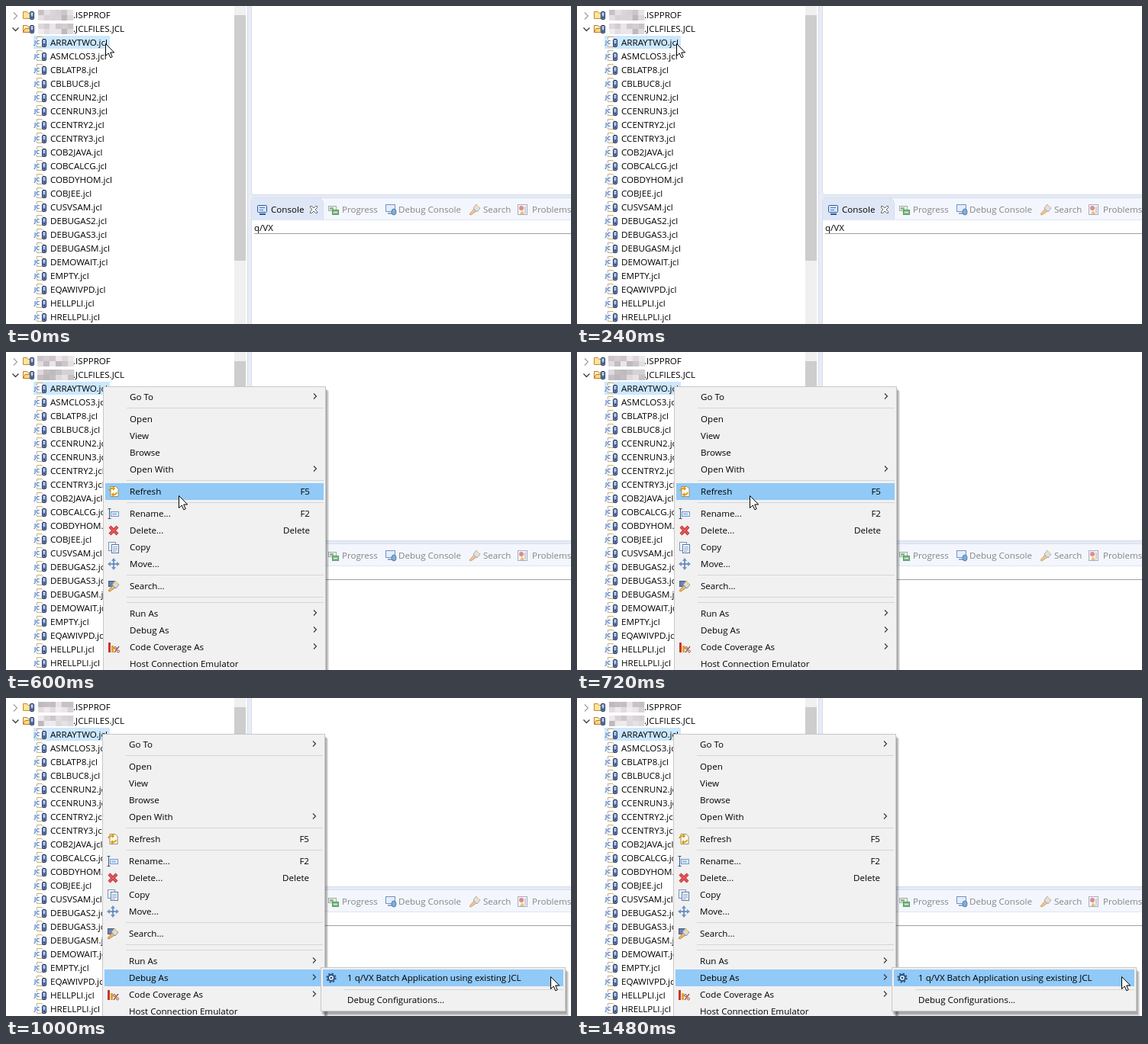
Animation of 740x417 px, one loop 1800 ms. Source, as an HTML page:

```html
<!DOCTYPE html>
<html lang="en">
<head>
<meta charset="utf-8">
<title>Context menu</title>
<style>
html, body { margin: 0; width: 100%; height: 100%; overflow: hidden; background: #fff; }
svg { display: block; width: 740px; height: 417px; }
text { font: 11.6px "Open Sans", "Noto Sans", sans-serif; white-space: pre; }
</style>
</head>
<body>
<svg viewBox="0 0 740 417"><g id="base"></g><g id="live"></g></svg>
<script>
const files = `ARRAYTWO ASMCLOS3 CBLATP8 CBLBUC8 CCENRUN2 CCENRUN3 CCENTRY2 CCENTRY3 COB2JAVA COBCALCG
  COBDYHOM COBJEE CUSVSAM DEBUGAS2 DEBUGAS3 DEBUGASM DEMOWAIT EMPTY EQAWIVPD HELLPLI HRELLPLI`.split(/\s+/);

// label, centre below the menu top, shortcut or '>', icon
const items = [
  ['Go To', 13, '>'], ['Open', 42], ['View', 64], ['Browse', 86], ['Open With', 108, '>'],
  ['Refresh', 137, 'F5', 'refresh'], ['Rename...', 166, 'F2', 'rename'],
  ['Delete...', 188, 'Delete', 'remove'], ['Copy', 210, '', 'copy'], ['Move...', 232, '', 'move'],
  ['Search...', 261, '', 'torch'], ['Run As', 297, '>'], ['Debug As', 319, '>'],
  ['Code Coverage As', 341, '>', 'bars'], ['Host Connection Emulator', 363]
];
const rules = [28, 123, 152, 247, 276, 283];

const poses = [
  { at: 0, tip: [130, 49], blur: [42, 46] },
  { at: 400, tip: [129, 49], blur: [42, 46], menu: [129, 50] },
  { at: 600, tip: [226, 188], blur: [41, 48], menu: [127, 45], hot: 'Refresh' },
  { at: 800, tip: [254, 302], blur: [42, 46], menu: [131, 45], hot: 'Search...' },
  { at: 1000, tip: [713, 365], blur: [42, 46], menu: [126, 47], hot: 'Debug As', sub: [412, 353] }
];

const rect = (x, y, w, h, fill, more = '') =>
  `<rect x="${x}" y="${y}" width="${w}" height="${h}" fill="${fill}" ${more}/>`;
const box = (x, y, w, h, fill, edge, more = '') =>
  rect(x + .5, y + .5, w - 1, h - 1, fill, `stroke="${edge}" ${more}`);
const path = (d, fill, stroke = 'none', width = 1) =>
  `<path d="${d}" fill="${fill}" stroke="${stroke}" stroke-width="${width}"/>`;
const text = (x, y, s, fill = '#000', more = '') =>
  `<text x="${x}" y="${y}" fill="${fill}" ${more}>${s}</text>`;
const put = (x, y, s) => `<g transform="translate(${x} ${y})">${s}</g>`;

const tower = box(0, 0, 6, 11, '#7d94c0', '#1d3361', 'rx="1.5"') +
  path('M1.5 2.5H4.5M1.5 4.5H4.5', 'none', '#e4ecfa') + rect(2, 7, 2, 2, '#24407a');

// Icons are centred on the origin.
const torch = path('M-7 6L-1-1 2 2-5 7Z', '#efb769', '#bd8440') +
  path('M-2-2L2-7 7-2 3 3Z', '#d7dbe5', '#8c93a6') + path('M2-6L6-2', 'none', '#f6cf70', 2);
const icons = {
  refresh: path('M-4-6.5H3L6-3.5V6.5H-4Z', '#fffdf2', '#a58b54') +
    path('M-6-1Q-5-5 0-4M-1-6L1-4-1-2M4 1Q3 5-2 4M0 2L-2 4 0 6', 'none', '#d99a16', 1.7),
  rename: box(-4, -3, 11, 7, '#eaf3fd', '#6d98c7') + rect(-2, -1, 6, 3, '#a9c9ea') +
    path('M-7.5-6.5H-3.5M-5.5-6V6M-7.5 6.5H-3.5', 'none', '#37577d'),
  remove: path('M-5-5L5 5M5-5L-5 5', 'none', '#b92d32', 4) + path('M-5-5L5 5M5-5L-5 5', 'none', '#e7595b', 2.3),
  copy: box(-7, -7, 10, 12, '#f3f7fd', '#7f95b4') + box(-3, -4, 10, 12, '#fff', '#587aa6') +
    path('M-1-.5H5M-1 1.5H5M-1 3.5H5M-1 5.5H3', 'none', '#85a6d0'),
  move: path('M0-6V6M-6 0H6', 'none', '#537cb5', 1.5) +
    path('M-3-4L0-8 3-4ZM-3 4L0 8 3 4ZM-4-3L-8 0-4 3ZM4-3L8 0 4 3Z', '#6d94c8'),
  torch: box(-7, -7, 9, 8, '#6c83ad', '#485c83') + torch,
  bars: rect(-7, -6, 3, 13, '#c9352f') + rect(-3, -2, 3, 9, '#e2a52d') +
    path('M1 7L7-1', 'none', '#703026', 1.2) +
    '<circle cx="2" cy="1" r="1.5" fill="none" stroke="#b04a36"/><circle cx="6" cy="5.5" r="1.5" fill="none" stroke="#b04a36"/>',
  gear: '<circle r="4" fill="#dcebfa" stroke="#294f7d" stroke-width="2"/>' +
    '<circle r="5.8" fill="none" stroke="#294f7d" stroke-width="1.6" stroke-dasharray="2.3 2.25"/>' +
    '<circle r="1.3" fill="#294f7d"/>'
};

function tree() {
  const folder = path('M.5 10.5V1.5H5.5L7 3.5H13.5V10.5Z', '#ffe49a', '#c28b2e');
  const openFolder = path('M.5 10.5V1.5H5.5L7 3.5H12.5V10.5Z', '#fff1c4', '#b97c28') +
    path('M.5 10.5L3 5.5H14L12 10.5Z', '#ffd982', '#b97c28');
  const fileIcon = path('M3.5.5H10L13.5 4V13.5H3.5Z', '#fffef7', '#c6b17c') +
    rect(0, 4, 10, 7, '#f4f8ff') +
    text(0, 10.2, 'JC', '#2458ad', 'style="font-size:7.6px;font-weight:600"') + put(10, 3, tower);
  return path('M10 8.5L14.5 13 10 17.5', 'none', '#a0a0a0', 1.2) +
    path('M8.5 28.5L12.5 32.5 16.5 28.5', 'none', '#404040', 1.4) +
    put(22, 6, folder) + put(31, 7, tower) + put(22, 24, openFolder) + put(31, 25, tower) +
    text(88, 16, '.ISPPROF') + text(88, 34, '.JCLFILES.JCL') +
    rect(36, 39, 100, 17, '#cce8ff') +
    files.map((f, i) => put(37, 40 + 18 * i, fileIcon) + text(58, 52 + 18 * i, f + '.jcl')).join('');
}

function panes() {
  const gray = '#858585';
  const progress = box(-7, -5, 11, 7, '#eef2ee', '#a0aaa3') + rect(-5, -3, 5, 3, '#86bf8a') +
    box(-2, 0, 9, 7, '#7fba83', '#5b9963') + path('M0 3.5H5', 'none', '#fff');
  const screen = box(-7, -6, 13, 10, '#d8e7fb', '#2c5a9d', 'rx="1"') +
    path('M-4-2.5H3M-4 .5H1', 'none', '#4577b9') + rect(-4, 5, 8, 2, '#2c5a9d');
  const debug = box(-7, -7, 13, 10, '#e4edfa', '#7293c5') + rect(-4, 4, 6, 2, '#8ca7d0') +
    '<ellipse cx="4" cy="3" rx="3" ry="4" fill="#84add8" stroke="#527caf"/>';
  const problems = box(-7, -7, 13, 14, '#f8f3f5', '#a7adc3') +
    '<circle cx="-2" cy="-2" r="3" fill="#dc8c8c"/>' +
    path('M-4 6L-1 1 2 6Z', '#e9c36a') + path('M3-4V5', 'none', '#98a7cc');
  return rect(299, 0, 15, 417, '#f0f0f0') + rect(299, 12, 15, 322, '#cdcdcd') +
    rect(316, 0, 424, 417, '#e8ecf7') + rect(316, 0, 1, 417, '#d7ddea') +
    path('M321.5-1V244Q321.5 247.5 325 247.5H741V-1Z', '#fff', '#d7ddea') +
    rect(322, 248, 418, 3, '#e5eaf6') +
    box(321, 251, 421, 168, '#fff', '#d7ddea', 'rx="3"') +
    rect(322, 252, 418, 29, '#f4f6fd') +
    path('M322 281V255Q322 252 325 252H408Q415 252 415 260V281Z', '#dfe7f7') +
    path('M415.5 281V260Q415 252 408 251.5', 'none', '#d3dcec') +
    rect(415, 280, 325, 1, '#e0e6f2') +
    put(336, 267, screen) + text(347, 271, 'Console') +
    path('M398.5 262.5H400.5L403 265 405.5 262.5H407.5V264.5L405 267 407.5 269.5V271.5H405.5L403 269 400.5 271.5H398.5V269.5L401 267 398.5 264.5Z', '#fff', '#666') +
    put(429, 267, progress) + text(440, 271, 'Progress', gray) +
    put(504, 267, debug) + text(514, 271, 'Debug Console', gray) +
    put(614, 267, `<g opacity=".75">${torch}</g>`) + text(625, 271, 'Search', gray) +
    put(677, 267, problems) + text(689, 271, 'Problems', gray) +
    text(325, 295, 'q/VX') + rect(325, 298, 415, 1, '#a0a0a0');
}

function frame(w, h) {
  return [4, 3, 2, 1].map(d => rect(d, d + 2, w, h, '#000', 'opacity=".1"')).join('') +
    box(0, 0, w, h, '#f1f1f1', '#c8c8c8');
}

function menu([x, y], hot) {
  const row = ([label, cy, key, icon]) =>
    (label === hot ? rect(3, cy - 10, 286, 22, '#91c9f7') : '') +
    (icon ? put(14, cy + 1, icons[icon]) : '') + text(35, cy + 5, label) +
    (key === '>' ? path(`M276 ${cy - 3.5}l3.5 3.5-3.5 3.5`, 'none', '#333', 1.1)
      : key ? text(271, cy + 5, key, '#000', 'text-anchor="end"') : '');
  return put(x, y, frame(292, 400) +
    rules.map(r => rect(31, r, 258, 1, '#d5d5d5')).join('') + items.map(row).join(''));
}

function submenu([x, y]) {
  return put(x, y, frame(321, 58) + rect(3, 3, 315, 22, '#91c9f7') + put(14, 14, icons.gear) +
    text(35, 18, '1 q/VX Batch Application using existing JCL') +
    rect(31, 29, 287, 1, '#d5d5d5') + text(35, 47, 'Debug Configurations...'));
}

function mosaic([x, w], seed) {
  let out = '';
  for (let i = 0; i < 24; i++) {
    const n = Math.sin(i * 12.9898 + seed * 78.233) * 43758.5453;
    const v = Math.round(188 + 54 * (n - Math.floor(n)));
    const col = i % 6, row = Math.floor(i / 6);
    out += rect(x + col * w / 6, 5 + (row >> 1) * 18 + row % 2 * 7, w / 6 + .3, 7, `rgb(${v},${v - 5},${v - 1})`);
  }
  return out;
}

const cursor = path('M.5.5V16.5L4.2 13 6.8 18.8 9.2 17.7 6.7 12H11.7Z', '#fff', '#000');

function scene(i) {
  const p = poses[i];
  return mosaic(p.blur, i + 1) + (p.menu ? menu(p.menu, p.hot) : '') +
    (p.sub ? submenu(p.sub) : '') + put(...p.tip, cursor);
}

const live = document.getElementById('live');
document.getElementById('base').innerHTML = tree() + panes();
let shown = -1;

function tick() {
  const t = performance.now() % 1800;
  const now = poses.findLastIndex(p => p.at <= t);
  if (now !== shown) live.innerHTML = scene(shown = now);
  requestAnimationFrame(tick);
}
tick();
</script>
</body>
</html>
```
